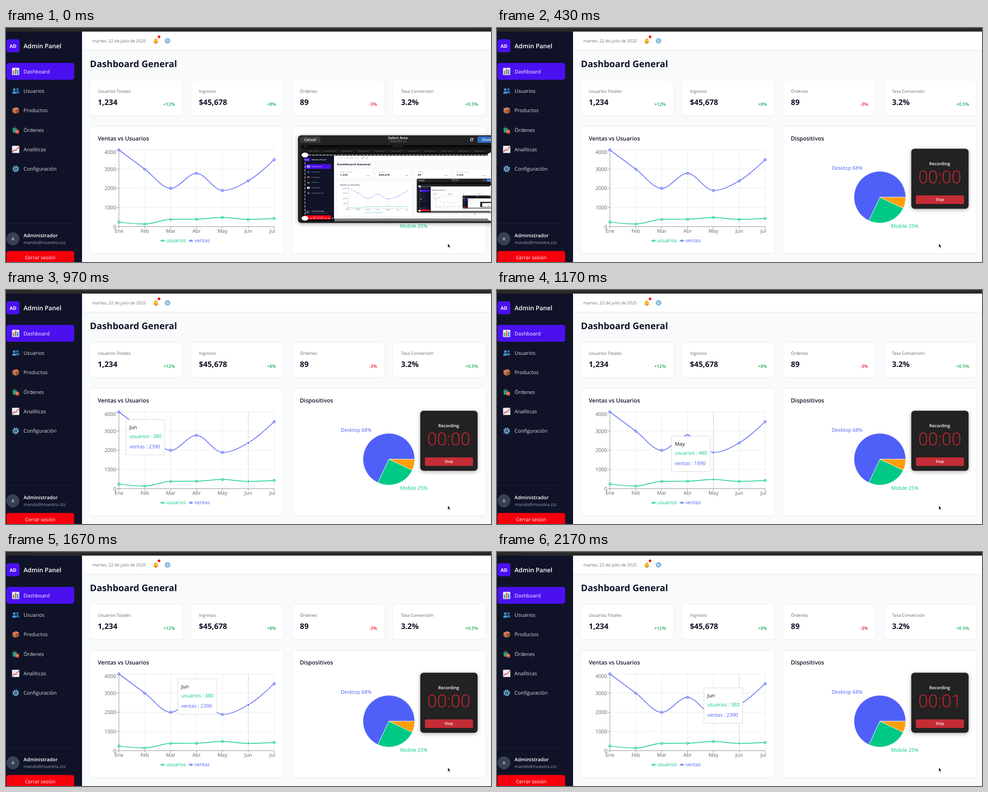
Recreate the animation shown at these times as an HTML page. Size 1078 px wide and 520 px high, loop 2.9 s.

```html
<!DOCTYPE html>
<html lang="es">
<head>
<meta charset="utf-8">
<title>Admin Panel</title>
<style>
  html, body { margin: 0; width: 100%; height: 100%; overflow: hidden; background: #f9fafc; }
  svg { display: block; width: 1078px; height: 520px; }
  text { font-family: "Open Sans", "Noto Sans", sans-serif; text-rendering: geometricPrecision; white-space: pre; }
  .clock { font-family: Roboto, "Open Sans", sans-serif; font-weight: 300; }
</style>
</head>
<body>
<svg id="stage" viewBox="0 0 1078 520" xmlns="http://www.w3.org/2000/svg"></svg>
<script>
const LOOP = 2900;
const BLUE = '#4f60f8', GREEN = '#00c985', ORANGE = '#ff9f05', INK = '#101327';

// --- drawing helpers ---
const text = (x, y, str, size, fill, weight = 400, anchor = 'start', more = '') =>
  `<text x="${x}" y="${y}" font-size="${size}" fill="${fill}" font-weight="${weight}" text-anchor="${anchor}" ${more}>${str}</text>`;
const rect = (x, y, w, h, fill, r = 0, more = '') =>
  `<rect x="${x}" y="${y}" width="${w}" height="${h}" rx="${r}" fill="${fill}" ${more}/>`;
const disc = (x, y, r, fill, more = '') => `<circle cx="${x}" cy="${y}" r="${r}" fill="${fill}" ${more}/>`;
const path = (d, stroke, width = 1, fill = 'none', more = '') =>
  `<path d="${d}" stroke="${stroke}" stroke-width="${width}" fill="${fill}" ${more}/>`;
const group = (attrs, ...parts) => `<g ${attrs}>${parts.join('')}</g>`;

// --- icons, drawn in a 16 x 16 box ---
const gear = disc(8, 8, 6.4, 'none', 'stroke="#5a9fd0" stroke-width="2.4" stroke-dasharray="2.6 2.43"') +
  disc(8, 8, 4.4, 'none', 'stroke="#6fb0dc" stroke-width="2.6"') + disc(8, 8, 1.8, '#8aa5b5');
const bust = (x, y, skin) => disc(x, y, 2.8, skin) +
  path(`M${x - 4.2} ${y + 9}v-2.2q0-3 4.2-3t4.2 3v2.2z`, 'none', 0, skin);
const icons = {
  bars: rect(0, 0, 16, 16, '#e8eef2', 1) + rect(2, 6, 3, 8.5, '#43a85c') +
    rect(6.5, 2, 3, 12.5, '#e0565b') + rect(11, 4.5, 3, 10, '#2f86d2'),
  users: bust(11.8, 4.4, '#2b6fa8') + bust(4.8, 5, '#4796d2'),
  box: path('M1 4L9 1L15.5 4V12L8 15.5L1 12Z', 'none', 0, '#b9764a') +
    path('M1 4L9 1L15.5 4L8 7Z', 'none', 0, '#dca06c') +
    path('M8 7L15.5 4V12L8 15.5Z', 'none', 0, '#94552f') +
    path('M4 2.9L11.5 5.6V9', '#d8444a', 1.7),
  bags: path('M3 4q0-3 2.5-3t2.5 3M9 8q0-2.5 2-2.5T13 8', '#8a6a3c', 1) +
    path('M0.8 4H10L11 14H1.8Z', 'none', 0, '#1fa37c') +
    path('M7 8H15L15.5 16H7.5Z', 'none', 0, '#e0524e') + rect(8, 10, 6.5, 1.6, '#f3c04f'),
  trend: rect(0, 0, 16, 16, '#f1f3f5', 1) + path('M0 5.3H16M0 10.6H16M5.3 0V16M10.6 0V16', '#cfd8de', .6) +
    path('M1 14L5 8.5L8 10.5L15 2', '#e0363c', 1.6),
  gear,
  bell: path('M8 1.5q4.6 0 4.8 5.4q.2 3 2.2 5.1H1q2-2.1 2.2-5.1Q3.4 1.5 8 1.5Z', 'none', 0, '#f9b92f') +
    disc(8, 13.3, 1.9, '#8a5a2b') + rect(1, 11.2, 14, 1.5, '#e09a1e', .7)
};
const icon = (name, x, y, size) =>
  group(`transform="translate(${x - size / 2} ${y - size / 2}) scale(${size / 16})"`, icons[name]);
const reload = (x, y, color) =>
  path(`M${x + 2.6} ${y - 1.6}A3 3 0 1 0 ${x + 3} ${y + .8}`, color, 1.2) +
  path(`M${x + 3.6} ${y - 3.6}v3.2h-3.2z`, 'none', 0, color);

// --- line chart ---
const months = ['Ene', 'Feb', 'Mar', 'Abr', 'May', 'Jun', 'Jul'];
const ventas = [4000, 3000, 2000, 2780, 1890, 2390, 3490];
const usuarios = [240, 139, 380, 390, 480, 380, 430];
const STEP = 57.5;
const px = i => 251 + i * STEP;
const py = v => 441.5 - v * .04262;

function monotone(values) {
  const y = values.map(py), last = y.length - 1;
  const s = y.slice(1).map((v, i) => (v - y[i]) / STEP);
  const m = y.map((_, i) => {
    const a = s[i - 1], b = s[i];
    return (Math.sign(a) + Math.sign(b)) * Math.min(Math.abs(a), Math.abs(b), Math.abs(a + b) / 4);
  });
  m[0] = (3 * s[0] - m[1]) / 2;
  m[last] = (3 * s[last - 1] - m[last - 1]) / 2;
  const k = STEP / 3;
  return `M${px(0)} ${y[0]}` + s.map((_, i) =>
    `C${px(i) + k} ${y[i] + m[i] * k} ${px(i + 1) - k} ${y[i + 1] - m[i + 1] * k} ${px(i + 1)} ${y[i + 1]}`).join('');
}

const series = (values, color) => path(monotone(values), color, 1.45) +
  values.map((v, i) => disc(px(i), py(v), 2.2, '#fff', `stroke="${color}" stroke-width="1.45"`)).join('');
const legend = (x, name, color) => path(`M${x} 472.8h10`, color, 1.4) +
  disc(x + 5, 472.8, 1.8, '#fff', `stroke="${color}" stroke-width="1.4"`) + text(x + 13, 476, name, 11, color);

function lineChart() {
  const levels = [0, 1000, 2000, 3000, 4000];
  const grid = levels.slice(1).map(v => `M251 ${py(v)}H596`).join('') +
    months.slice(1).map((_, i) => `M${px(i + 1)} 271V441.5`).join('');
  const ticks = levels.map(v => `M246.5 ${py(v)}h4.5`).join('') + months.map((_, i) => `M${px(i)} 441.5v4.5`).join('');
  return path(grid, '#ccc', .8, 'none', 'stroke-dasharray="2.2 2.2"') +
    path('M251 271V441.5H596' + ticks, '#707070', .8) +
    levels.map(v => text(245, v === 4000 ? 280 : py(v) + 4.2, v, 11.5, '#666', 400, 'end')).join('') +
    months.map((m, i) => text(i === 6 ? 592 : px(i), 455, m, 11.3, '#666', 400, 'middle')).join('') +
    series(usuarios, GREEN) + series(ventas, BLUE) +
    legend(343, 'usuarios', GREEN) + legend(406, 'ventas', BLUE);
}

function pie() {
  const at = share => {
    const a = share * 2 * Math.PI;
    return `${851 + 57.5 * Math.cos(a)} ${376 - 57.5 * Math.sin(a)}`;
  };
  const slice = (from, to, color) =>
    path(`M851 376L${at(from)}A57.5 57.5 0 ${+(to - from > .5)} 0 ${at(to)}Z`, '#fff', .8, color);
  return slice(0, .68, BLUE) + slice(.68, .93, GREEN) + slice(.93, 1, ORANGE) +
    text(812.5, 315, 'Desktop 68%', 11.25, BLUE, 400, 'end') + text(876, 443.6, 'Mobile 25%', 11.25, GREEN);
}

// --- dashboard page ---
const card = (x, y, w, h) => rect(x, y + .8, w, h, '#eef0f4', 7) +
  rect(x, y, w, h, '#fff', 7, 'stroke="#e4e8ee" stroke-width=".8"');
const stat = (x, label, value, delta) => card(x, 115.6, 206.8, 78.8) +
  text(x + 17.9, 144, label, 9.55, '#626a76') + text(x + 17.9, 171, value, 16.9, INK, 700) +
  text(x + 189.3, 173, delta, 10.05, delta[0] === '-' ? '#e0202a' : '#16ad58', 600, 'end');

function dashboard() {
  const nav = [['bars', 'Dashboard'], ['users', 'Usuarios'], ['box', 'Productos'],
    ['bags', 'Órdenes'], ['trend', 'Analíticas'], ['gear', 'Configuración']];
  const side = rect(0, 8, 169, 512, INK) + rect(1, 25, 29, 29, '#4b10f0', 5) +
    text(15.5, 43.9, 'AD', 10.6, '#fff', 700, 'middle') + text(39, 45, 'Admin Panel', 13.8, '#fff', 600) +
    rect(1, 77.5, 150.5, 37.5, '#4b10f0', 5) +
    nav.map(([name, label], i) => icon(name, 21.5, 96.6 + i * 43.3, 16) +
      text(39, 100.6 + i * 43.3, label, 11.3, i ? '#d6dae2' : '#fff')).join('') +
    path('M0 434.5H152', '#1f2639', .8) + disc(15.3, 468.5, 14.4, '#374153') +
    text(15.3, 472.2, 'A', 10, '#fff', 400, 'middle') + text(39, 465, 'Administrador', 10.9, '#fff', 600) +
    text(39, 480, 'mando@muestra.zzz', 9.6, '#99a1b0') +
    rect(1, 495.5, 150.5, 34, '#f6000d', 5) + text(76, 514, 'Cerrar sesión', 10.85, '#fff', 400, 'middle');
  const top = rect(0, 0, 1078, 8, '#292929') + rect(58, 0, 980, 2, '#333') +
    rect(169, 8, 909, 41, '#fff') + rect(169, 48.6, 909, 1, '#e2e5ea') + rect(169, 49.6, 909, 1, '#f1f3f6') +
    text(192, 31.8, 'martes, 22 de julio de 2025', 9.46, '#6b7280') +
    icon('bell', 333, 28.8, 13.5) + disc(340.2, 19.6, 2.9, '#f5000f') + icon('gear', 359, 28.5, 13.5);
  const main = text(186.5, 86.5, 'Dashboard General', 20.2, INK, 700) +
    stat(186.2, 'Usuarios Totales', '1,234', '+12%') + stat(410.8, 'Ingresos', '$45,678', '+8%') +
    stat(635.4, 'Órdenes', '89', '-3%') + stat(860, 'Tasa Conversión', '3.2%', '+0.5%') +
    card(186.2, 218.2, 431.4, 283.6) + card(635.4, 218.2, 431.4, 283.6) +
    text(204, 250, 'Ventas vs Usuarios', 12.55, INK, 600) + text(653, 250, 'Dispositivos', 12.75, INK, 600);
  const pointer = path('M982 479V488L984 486.2L985.6 489.8L987 489.2L985.4 485.7L988 485.5Z', '#fff', .6, '#111');
  return rect(0, 0, 1078, 520, '#f9fafc') + side + top + main + lineChart() + pie() + pointer;
}

// --- area picker, which contains itself ---
function picker(depth) {
  const knob = (x, y) => `<ellipse cx="${x}" cy="${y}" rx="7.5" ry="5.4" fill="#fff"/>`;
  const tabs = Array.from({ length: 11 }, (_, i) => text(672 + i * 37, 275, 'Panel nuevo  ×', 3.6, '#8a8a8a')).join('');
  return rect(649, 238.5, 445, 194.8, '#232323', 7, 'filter="url(#soft)"') +
    rect(653, 241, 46, 14, '#3b3b3b', 4) + text(676, 250.8, 'Cancel', 8.2, '#fff', 600, 'middle') +
    text(871, 247, 'Select Area', 8.1, '#fff', 600, 'middle') + text(871, 254, '1868×901 px', 6.6, '#8c8c8c', 400, 'middle') +
    reload(1035, 248, '#fff') + rect(1048, 241, 40, 14, '#2f6ec2', 4) + text(1058, 250.8, 'Done', 8.2, '#fff', 600) +
    rect(657, 260, 437, 169.5, '#121212') + rect(657, 260, 437, 5, '#090909') + rect(657, 270, 437, 6.5, '#1d1d1d') +
    text(662, 264, '● ▬', 3.4, '#aaa') + text(871, 264, '22 de jul 10:30', 3.4, '#999', 400, 'middle') + tabs +
    rect(664, 423, 66, 6.5, '#0a0c18') + rect(730, 423, 364, 6.5, '#7d7e80') +
    `<use href="#dash" transform="translate(664 281.8) scale(.3845 .2715)"/>` +
    (depth ? group('transform="translate(663.7 243.4) scale(.3845)"', picker(depth - 1)) : '') +
    path('M664.5 282.3H1078V423H664.5Z', '#fff', 1, 'none', 'stroke-dasharray="5 3"') +
    knob(664.5, 282.2) + knob(1078, 282.2) + knob(664.5, 422.8) + knob(1078, 422.8);
}

// --- recorder window ---
const setup = path('M931 279.5h6M931 282h6M931 284.5h6', '#ddd', 1) +
  text(974.5, 280, 'Selection', 8.3, '#fff', 600, 'middle') + text(975, 289, 'GIF • 30 FPS', 6.4, '#8d8d8d', 400, 'middle') +
  disc(1013, 282, 6.6, '#3d3d3d') + disc(1034.4, 282, 6.6, '#3d3d3d') +
  path('M1010.8 284h4.4M1032.4 280l4 4M1036.4 280l-4 4', '#ddd', 1) +
  rect(931, 295, 107, 43, '#383838', 4) + rect(984, 295, 54, 43, '#626262', 4) +
  rect(957, 310, 10, 8, 'none', 1, 'stroke="#eee" stroke-width="1.3"') + rect(950, 314, 6, 5, 'none', 1, 'stroke="#eee" stroke-width="1.2"') +
  path('M959 322h6M962 320v5', '#eee', 1.2) +
  rect(1002, 312, 14, 13, 'none', 2, 'stroke="#fff" stroke-width="1.2" stroke-dasharray="2.5 1.6"') + rect(1007, 308, 12, 12, '#ccc', 2) +
  rect(931, 345, 31.5, 19.5, '#383838', 3) + rect(969, 345, 31.5, 19.5, '#2c2c2c', 3) + rect(1007, 345, 31, 19.5, '#565656', 3) +
  path('M942 353h2.5l3-2.5v8.5l-3-2.5h-2.5z', 'none', 0, '#3f62c8') + path('M949.5 352q2.5 2.8 0 5.6', '#3f62c8', 1) +
  rect(983, 349, 3.6, 7, '#666', 1.8) + path('M981 354q3.8 6 7.6 0M984.8 357.5v3', '#666', 1) +
  rect(1018.5, 349.5, 7, 10.5, 'none', 3.5, 'stroke="#eee" stroke-width="1.1"') + path('M1022 350v4', '#eee', 1) +
  rect(931, 372, 79.5, 19, '#3a70d0', 3) + rect(1011, 372, 27, 19, '#3a2a2c', 3) +
  text(970.5, 384.4, 'Record', 8.2, '#fff', 600, 'middle') + reload(1027, 381.5, '#eee');
const clock = str => text(984.2, 345, str, 39.6, '#bb2430', 300, 'middle', 'class="clock"');
const recorder = rect(921, 268.5, 127, 133, '#222224', 7, 'filter="url(#soft)"') +
  rect(921, 268.5, 127, 133, 'none', 7, 'stroke="#383838" stroke-width=".6"') +
  group('id="setup"', setup) +
  group('id="live"', text(984, 305, 'Recording', 9.6, '#fff', 600, 'middle'),
    group('id="sec0"', clock('00:00')), group('id="sec1"', clock('00:01')),
    rect(931, 372, 107, 19, '#c42c36', 3), text(984.3, 384.4, 'Stop', 8.5, '#fff', 600, 'middle'));

// --- hover state of the chart ---
const active = [3, 4, 5, 6];
const marker = i => group(`class="${months[i]}"`, path(`M${px(i)} 271V441.5`, '#ccc', .9),
  ...[[usuarios, GREEN], [ventas, BLUE]].map(([s, c]) => disc(px(i), py(s[i]), 2.9, c, 'stroke="#fff" stroke-width="1.4"')));
const tipText = i => group(`class="${months[i]}"`, text(7.4, 21, months[i], 11.2, '#111'),
  text(7.4, 41.2, `usuarios : ${usuarios[i]}`, 11, GREEN), text(7.4, 64.2, `ventas : ${ventas[i]}`, 11.15, BLUE));
const tip = group('id="tip"', rect(0, 0, 86, 78.6, '#fff', 0, 'stroke="#ccc" stroke-width=".8"'), ...active.map(tipText));

document.getElementById('stage').innerHTML =
  `<defs><filter id="soft" x="-20%" y="-20%" width="140%" height="140%">
    <feDropShadow dx="0" dy="2" stdDeviation="5" flood-color="#000" flood-opacity=".35"/></filter></defs>` +
  group('id="dash"', dashboard()) + active.map(marker).join('') + tip +
  group('id="recorder"', recorder) + group('id="picker"', picker(3));

// --- timing: stops are [ms, declarations, easing towards the next stop] ---
const animate = (name, target, stops) => `@keyframes ${name} {` +
  stops.map(([ms, css, ease = 'step-end']) => `${ms / LOOP * 100}% { ${css}; animation-timing-function: ${ease} }`).join(' ') +
  `} ${target} { animation: ${name} ${LOOP}ms infinite }`;
const fade = (id, stops) => animate(id, '#' + id, stops.map(([ms, o, ease]) => [ms, `opacity: ${o}`, ease]));
const at = (x, y, shown = 1) => `opacity: ${shown}; transform: translate(${x}px, ${y}px)`;
const hover = (name, ...spans) => animate(name, '.' + name,
  [[0, 'opacity: 0'], ...spans.flatMap(([from, to]) => [[from, 'opacity: 1'], [to, `opacity: ${+(to === LOOP)}`]])]);

const style = document.createElement('style');
style.textContent = [
  fade('picker', [[0, 1], [100, .8, 'steps(3)'], [200, 0], [LOOP, 0]]),
  fade('recorder', [[0, 0], [100, .4, 'steps(2)'], [160, 1], [LOOP, 1]]),
  fade('setup', [[0, 1], [160, 1, 'steps(2)'], [230, .45, 'steps(4)'], [390, 0], [LOOP, 0]]),
  fade('live', [[0, 0], [160, 0, 'steps(2)'], [230, .62, 'steps(4)'], [390, 1], [LOOP, 1]]),
  fade('sec0', [[0, 1], [2170, 0], [LOOP, 0]]),
  fade('sec1', [[0, 0], [2170, 1], [LOOP, 1]]),
  animate('tip', '#tip', [
    [0, at(215, 272, 0)], [870, at(215, 272), 'steps(10)'], [1170, at(388, 325), 'steps(4)'],
    [1300, at(402, 316)], [1500, at(380, 292)], [1670, at(382, 282), 'steps(5)'],
    [1830, at(414, 298.5), 'steps(3)'], [1930, at(456, 311)], [2170, at(460, 302)], [LOOP, at(460, 302)]]),
  hover('Jul', [870, 960], [1740, 2170]),
  hover('Jun', [960, 1060], [1670, 1740], [2170, LOOP]),
  hover('May', [1060, 1205], [1500, 1670]),
  hover('Abr', [1205, 1500])
].join('\n');
document.head.append(style);
</script>
</body>
</html>
```
